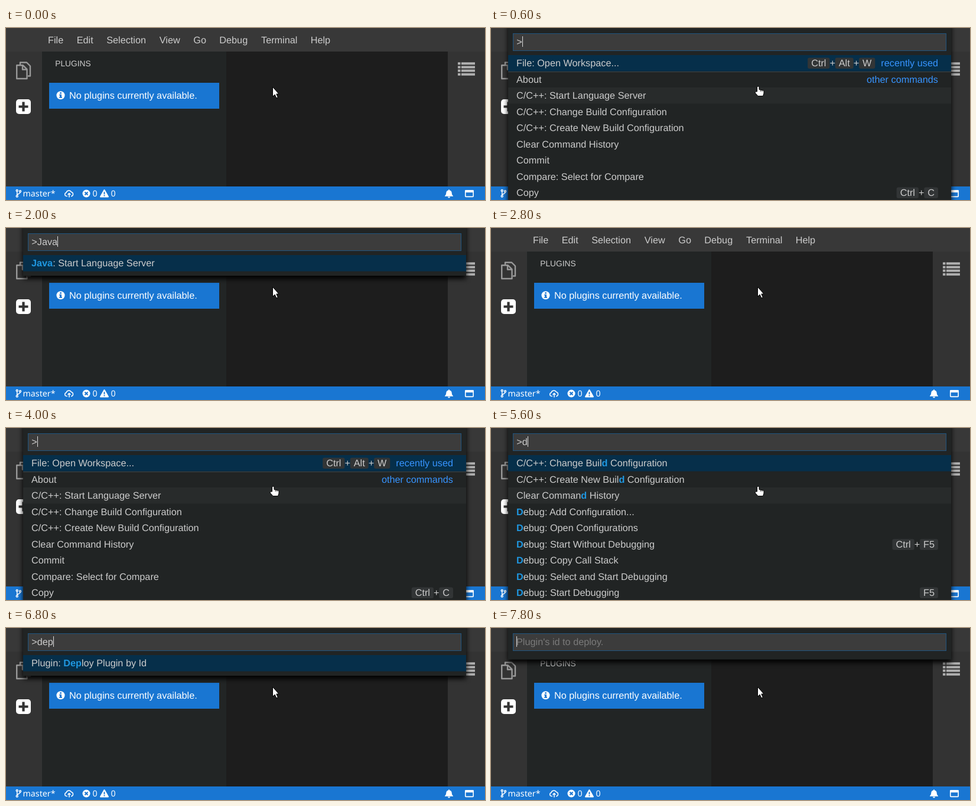
An HTML page for the animation above (8000 ms loop, 811 by 292 pixels).

```html
<!DOCTYPE html>
<html lang="en">
<head>
<meta charset="utf-8">
<title>Command palette</title>
<style>
  html, body { margin: 0; width: 100%; height: 100%; overflow: hidden; background: #1d1d1d; }
  svg { display: block; width: 811px; height: 292px; }
  text { font: 16.25px "Liberation Sans", Arial, sans-serif; fill: #ccc; text-rendering: geometricPrecision; white-space: pre; }
  .title { font-size: 13.75px; }
  .status text { font: 14.25px "Noto Sans", sans-serif; fill: #fff; }
  .white { fill: #fff; }
  .match { fill: #1f97e0; font-weight: 700; }
  .group { fill: #3794ff; }
  .hint { fill: #7a7a7a; }
  .shadow { filter: drop-shadow(0 5px 4px #000); }
</style>
</head>
<body>
<svg viewBox="0 0 811 292">
  <rect width="811" height="292" fill="#1d1d1d"/>
  <rect y="40" width="61" height="229" fill="#333"/>
  <rect x="748" y="40" width="63" height="229" fill="#333"/>
  <rect x="61" y="40" width="312" height="229" fill="#222525"/>
  <rect width="811" height="40" fill="#383838"/>
  <g id="menu"></g>

  <g fill="#333" stroke="#999" stroke-width="2.4" stroke-linejoin="round">
    <path d="M24 62V58.5H35L41 64.5V81.5H37"/>
    <path d="M18.2 63.2H28.5L35.5 70.2V86H18.2Z"/>
    <path d="M28 63.5V70.5H35" fill="none"/>
  </g>
  <rect x="17" y="121" width="25" height="25" rx="5" fill="#fff"/>
  <path d="M29.5 125.5V141.5M21.5 133.5H37.5" stroke="#333" stroke-width="4.2"/>
  <path d="M765 60.2H769.5M771 60.2H794M765 66.4H769.5M771 66.4H794M765 72.6H769.5M771 72.6H794M765 78.8H769.5M771 78.8H794" stroke="#b0b0b0" stroke-width="4"/>

  <text class="title" x="83.3" y="65">PLUGINS</text>
  <rect x="73" y="93" width="288" height="44" fill="#1976d2"/>
  <circle cx="92.5" cy="114.3" r="7" fill="#fff"/>
  <path d="M91.2 109.2H94V111.4H91.2ZM90.2 112.8H94V117H95V118.8H90.2V117H91.2V114.6H90.2Z" fill="#1976d2"/>
  <text class="white" x="107" y="120">No plugins currently available.</text>

  <g class="status">
    <rect y="269" width="811" height="23" fill="#1976d2"/>
    <g fill="none" stroke="#fff" stroke-width="1.4">
      <circle cx="18.7" cy="276" r="1.5"/><circle cx="18.7" cy="285.5" r="1.5"/><circle cx="24" cy="277.3" r="1.5"/>
      <path d="M18.7 277.5V284M24 279C24 282 19 281 18.9 284"/>
      <path d="M104 285.5H102.5A3 3 0 0 1 102 279.6A4.6 4.6 0 0 1 110.6 278.6A3.6 3.6 0 0 1 111.2 285.5H110M107 287.5V281M104.5 283L107 280.5L109.5 283" stroke-width="1.5"/>
      <rect x="777.8" y="275.8" width="13.4" height="10.6" rx="1" stroke-width="1.6"/>
      <path d="M777.5 277.2H791.5" stroke-width="4"/>
    </g>
    <text x="28.5" y="286">master*</text>
    <circle cx="136" cy="281" r="6.5" fill="#fff"/>
    <path d="M133.5 278.5L138.5 283.5M138.5 278.5L133.5 283.5" stroke="#1976d2" stroke-width="2"/>
    <text x="146.5" y="286">0</text>
    <path d="M166.5 275L173 286.5H160Z" fill="#fff" stroke="#fff" stroke-width="2" stroke-linejoin="round"/>
    <path d="M166.5 278.3V282.3M166.5 283.6V285.6" stroke="#1976d2" stroke-width="1.9"/>
    <text x="177.5" y="286">0</text>
    <path d="M743 285C745.5 283 745 281 745.4 279C745.8 276.6 747.5 275.7 749.2 275.4V274.3H750.8V275.4C752.5 275.7 754.2 276.6 754.6 279C755 281 754.5 283 757 285V285.8H743ZM748 286.4H752A2 2 0 0 1 748 286.4Z" fill="#fff"/>
  </g>

  <g id="palette"></g>
  <rect id="caret" y="14" width="1" height="18" fill="#ddd"/>
  <path id="arrow" d="M451.5 100V116.3L455.2 113L457.7 118.8L460.3 117.7L457.8 112H462Z" fill="#fff" stroke="#000"/>
  <g id="hand" stroke="#000" stroke-linejoin="round">
    <path d="M450.5 108V100.8A1.7 1.7 0 0 1 454 100.8V104.5L461 106Q462 106.5 462 108V111L460.5 115.5H452L447.3 110.2Q446.8 108.3 448.5 108Z" fill="#fff"/>
    <path d="M456.3 105.5V108M459 106V108.3" stroke-width=".8"/>
  </g>
  <text id="ruler" visibility="hidden"></text>
</svg>
<script>
const byId = id => document.getElementById(id);
const LOOP = 8000, BLINK = 600;
const ROW_TOP = 46, ROW_HEIGHT = 27.5;

// Each row: label | shortcut keys | group name
const allCommands = [
  "File: Open Workspace...|Ctrl Alt W|recently used", "About||other commands",
  "C/C++: Start Language Server", "C/C++: Change Build Configuration",
  "C/C++: Create New Build Configuration", "Clear Command History", "Commit",
  "Compare: Select for Compare", "Copy|Ctrl C"];
const debugCommands = [
  "Debug: Add Configuration...", "Debug: Open Configurations",
  "Debug: Start Without Debugging|Ctrl F5", "Debug: Copy Call Stack",
  "Debug: Select and Start Debugging", "Debug: Start Debugging|F5"];
const javaCommand = ["Java: Start Language Server"];
const deployCommand = ["Plugin: Deploy Plugin by Id"];

// Start time, typed query (null when closed), rows, placeholder
const steps = [
  [0, null],
  [600, "", allCommands],
  [1400, "J", [...javaCommand, "JSON: Start Language Server", "Settings: Open Keyboard Shortcuts (JSON)"]],
  [1600, "Ja", javaCommand],
  [1800, "Jav", javaCommand],
  [2000, "Java", javaCommand],
  [2800, null],
  [4000, "", allCommands],
  [5600, "d", [...allCommands.slice(3, 6), ...debugCommands]],
  [5800, "de", [...debugCommands, "Debug: Toggle Breakpoint|F9", "Debug: Enable All Breakpoints", "Debug: Remove All Breakpoints"]],
  [6800, "dep", deployCommand],
  [7000, "depl", deployCommand],
  [7200, "deplo", deployCommand],
  [7600, null],
  [7800, "", [], "Plugin's id to deploy."]];

const rect = (x, y, w, h, fill, extra = "") =>
  `<rect x="${x}" y="${y}" width="${w}" height="${h}" fill="${fill}" ${extra}/>`;
const text = (x, y, content, cls = "") => `<text x="${x}" y="${y}" class="${cls}">${content}</text>`;
const escapeText = s => s.replace(/>/g, "&gt;");

function textWidth(s) {
  byId("ruler").textContent = s;
  return byId("ruler").getComputedTextLength();
}

function highlight(label, query) {
  const at = label.toLowerCase().indexOf(query.toLowerCase());
  if (!query || at < 0) return label;
  const end = at + query.length;
  return `${label.slice(0, at)}<tspan class="match">${label.slice(at, end)}</tspan>${label.slice(end)}`;
}

function shortcut(keys, right, baseline) {
  let out = "";
  keys.split(" ").reverse().forEach((key, i) => {
    if (i) {
      right -= 9.3;
      out += text(right, baseline, "+");
    }
    const width = textWidth(key) + 12;
    right -= width;
    out += rect(right, baseline - 14.5, width, 18.5, "#323536", 'rx="3"') + text(right + 6, baseline, key);
  });
  return out;
}

function row(item, i, query) {
  const [label, keys, group] = item.split("|");
  const top = ROW_TOP + i * ROW_HEIGHT, baseline = Math.round(top + 19);
  let right = 757, out = "";
  if (i === 0) out += rect(29, top, 750, ROW_HEIGHT, "#062f4a");
  if (i === 2) out += rect(29, top, 750, ROW_HEIGHT, "#282b2b");
  if (group) {
    const x = right - textWidth(group);
    out += text(x, baseline, group, "group");
    if (i === 1) out += rect(29, 74, 750, 1, "#3f4447");
    right = x - 10;
  }
  out += text(43, baseline, highlight(label, query));
  return keys ? out + shortcut(keys, right, baseline) : out;
}

function palette(query, rows, hint) {
  const height = rows.length > 8 ? 330 : ROW_TOP + rows.length * ROW_HEIGHT + 7.5;
  return rect(29, -10, 750, height + 10, "#212424", 'class="shadow"') +
    rect(37.5, 9.5, 733, 29, "#3c3c3c", 'stroke="#1f5580"') +
    (hint ? text(43, 29, hint, "hint") : text(43.3, 29, escapeText(">" + query))) +
    rows.map((item, i) => row(item, i, query)).join("");
}

byId("menu").innerHTML = [
  [71, "File"], [119.7, "Edit"], [170.2, "Selection"], [259.8, "View"], [317.3, "Go"],
  [361.3, "Debug"], [432, "Terminal"], [515.7, "Help"]
].map(([x, label]) => text(x, 26, label)).join("");

const show = (id, visible) => byId(id).setAttribute("visibility", visible ? "visible" : "hidden");
const start = performance.now();
let current;

function frame() {
  const time = (performance.now() - start) % LOOP;
  const step = steps.findLast(([from]) => from <= time);
  const [from, query, rows, hint] = step;
  const open = query !== null;
  if (step !== current) {
    current = step;
    byId("palette").innerHTML = open ? palette(query, rows, hint) : "";
    const overList = open && rows.length > 2;
    show("hand", overList);
    show("arrow", !overList);
    if (open) byId("caret").setAttribute("x", hint ? 43 : Math.floor(43.5 + textWidth(">" + query)));
  }
  show("caret", open && (time - from) % (2 * BLINK) < BLINK);
  requestAnimationFrame(frame);
}
frame();
</script>
</body>
</html>
```
